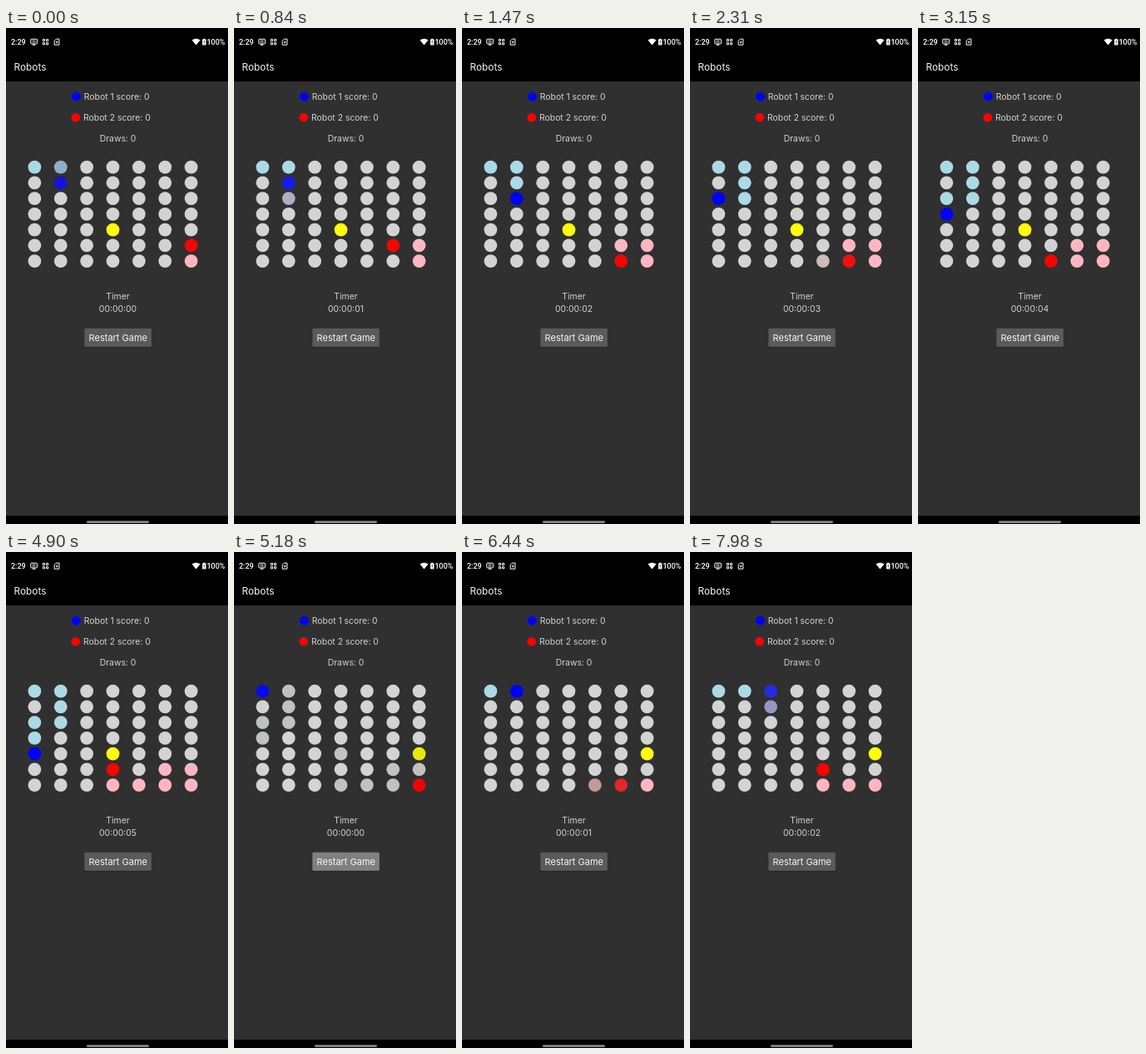
Write an HTML page that moves like this. It is 267 px wide and 594 px high and loops after 8000 ms.

```html
<!DOCTYPE html>
<html lang="en">
<head>
<meta charset="utf-8">
<title>Robots</title>
<style>
html, body { margin: 0; width: 100%; height: 100%; overflow: hidden; background: #303030; }
svg { display: block; width: 267px; height: 594px; }
text { font: 10.4px Inter, sans-serif; fill: #d2d2d2; }
.mid { text-anchor: middle; }
.status { font: 500 9px Roboto, sans-serif; fill: #fff; }
.line { fill: none; stroke: #fff; }
</style>
</head>
<body>
<svg viewBox="0 0 267 594">
  <rect width="267" height="594" fill="#303030"/>
  <rect width="267" height="64" fill="#000"/>
  <rect y="584" width="267" height="10" fill="#000"/>
  <rect x="97" y="590.3" width="75" height="2.6" rx="1.3" fill="#868686"/>

  <text class="status" x="6" y="20">2:29</text>
  <text class="status" x="241.5" y="20" textLength="">100%</text>
  <g class="line">
    <rect x="29.8" y="13.3" width="7.6" height="5.6" rx=".6"/>
    <path d="M31.5 15.2h4.2M31.5 17h4.2" stroke-width=".8"/>
    <path d="M31.8 20.2h3.6" stroke-width="1.2"/>
    <path d="M44.3 13.5h2.2v2.2h-2.2zM48.5 13.5h2.2v2.2h-2.2zM44.3 17.7h2.2v2.2h-2.2zM48.5 17.7h2.2v2.2h-2.2z"/>
    <path d="M60.3 13.2h3.6v7h-5.7v-4.9z"/>
    <path d="M61.2 15.5v3M59.8 17h2.8" stroke-width=".9"/>
  </g>
  <path d="M223.6 14.6q5-3.6 10 0l-5 5.9z" fill="#fff"/>
  <path d="M236.2 13.6h1.2v-.9h2v.9h1.2v7h-4.4z" fill="#fff"/>
  <path d="M238.4 15v2.8M238.4 18.6v.8" stroke="#000" stroke-width=".7"/>

  <text x="9.6" y="51" style="font-size:11.8px;fill:#f4f4f4">Robots</text>
  <circle cx="84.5" cy="82.2" r="5.4" fill="#00f"/>
  <text x="93.8" y="85.7">Robot 1 score: 0</text>
  <circle cx="83.8" cy="107.2" r="5.4" fill="#f00"/>
  <text x="93" y="110.7">Robot 2 score: 0</text>
  <text class="mid" x="134.5" y="135.7">Draws: 0</text>
  <g id="board"></g>
  <text class="mid" x="134.5" y="325.4">Timer</text>
  <text class="mid" x="134.5" y="340.4" id="clock">00:00:00</text>
  <rect x="94" y="360.5" width="81" height="22.4" rx="1.5" fill="#262626"/>
  <rect id="button" x="94.3" y="359.8" width="80.6" height="22" rx="1.3" fill="#5a5a5a"/>
  <text class="mid" x="134.8" y="375.2" style="font-size:11px;fill:#f6f6f6">Restart Game</text>
</svg>
<script>
const LOOP = 8000, FADE = 150, RESTART = 5050;
const BACK = [48, 48, 48], GREY = [211, 211, 211], YELLOW = [255, 255, 0];
const BLUE = { body: [0, 0, 255], trail: [173, 216, 230] };
const RED = { body: [255, 0, 0], trail: [255, 182, 193] };

const clamp = v => Math.max(0, Math.min(1, v));
const mix = (a, b, p) => a.map((v, i) => v + (b[i] - v) * p);
const rgb = c => `rgb(${c.map(Math.round)})`;
const $ = id => document.getElementById(id);

// Each cell keeps a history of colour changes.
const cells = [];
for (let i = 0; i < 49; i++) {
  const dot = document.createElementNS("http://www.w3.org/2000/svg", "circle");
  dot.setAttribute("cx", 34.4 + (i % 7) * 31.38);
  dot.setAttribute("cy", 166.6 + Math.floor(i / 7) * 18.75);
  dot.setAttribute("r", 7.9);
  $("board").append(dot);
  cells.push({ dot, log: [{ at: -9999, color: GREY, fade: FADE }] });
}

function paint([x, y], at, color, fade = FADE) {
  cells[y * 7 + x].log.push({ at, color, fade });
}

// The path's first cell is occupied at "start"; each time moves one cell on.
function walk(robot, start, path, times) {
  paint(path[0], start, robot.body);
  times.forEach((at, i) => {
    paint(path[i], at, robot.trail);
    paint(path[i + 1], at, robot.body);
  });
}

paint([0, 0], -9000, BLUE.trail);
paint([6, 6], -9000, RED.trail);
paint([3, 4], -9000, YELLOW);
walk(BLUE, -9000, [[1, 0], [1, 1], [1, 2], [0, 2], [0, 3], [0, 4]],
  [-115, 825, 1850, 2846, 3850]);
walk(RED, -9000, [[6, 5], [5, 5], [5, 6], [4, 6], [3, 6], [3, 5]],
  [326, 1320, 2301, 3358, 4330]);

// Restart: robots vanish at once, trails fade.
for (const { log } of cells) {
  const { color } = log[log.length - 1];
  const isRobot = color === BLUE.body || color === RED.body;
  if (color !== GREY) log.push({ at: RESTART, color: GREY, fade: isRobot ? 1 : FADE });
}
for (const i of [0, 48]) cells[i].log.pop();
paint([6, 4], RESTART, YELLOW);
walk(BLUE, RESTART, [[0, 0], [1, 0], [2, 0], [2, 1]], [5926, 6906, 7955]);
walk(RED, RESTART, [[6, 6], [5, 6], [4, 6], [4, 5]], [5440, 6416, 7406]);

function cellColor(log, t) {
  let i = log.length - 1;
  while (i > 0 && log[i].at > t) i--;
  const { at, color, fade } = log[i];
  const p = clamp((t - at) / fade);
  const old = i ? log[i - 1].color : GREY;
  // Old disc fades out while the new one fades in over it.
  return p < 1 ? mix(mix(old, BACK, p), color, p) : color;
}

function draw(t) {
  for (const { dot, log } of cells) dot.setAttribute("fill", rgb(cellColor(log, t)));
  const seconds = t < RESTART ? Math.floor((t + 900) / 1000) : Math.floor((t - 5085) / 1000);
  $("clock").textContent = "00:00:0" + Math.max(0, seconds);
  const press = Math.min(clamp((t - 4900) / 120), clamp((5600 - t) / 350));
  $("button").setAttribute("fill", rgb(mix([90, 90, 90], [128, 128, 128], press)));
}

const begin = performance.now();
function tick() {
  draw((performance.now() - begin) % LOOP);
  requestAnimationFrame(tick);
}
draw(0);
tick();
</script>
</body>
</html>
```
